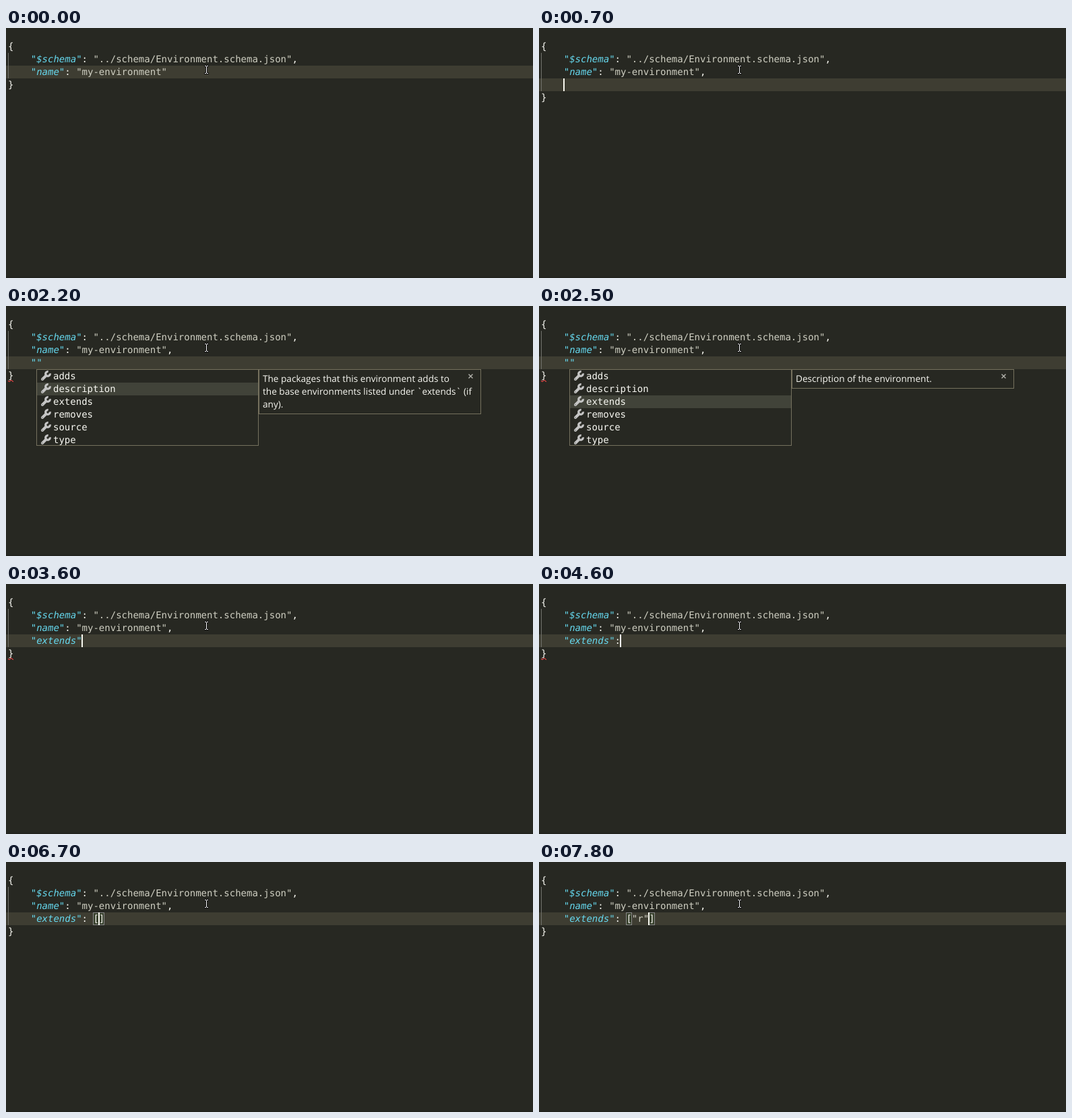
These frames come from a looping animation (782 by 372 pixels, 8000 ms). An HTML page with a canvas:

```html
<!DOCTYPE html>
<html lang="en">
<head>
<meta charset="utf-8">
<title>JSON editor with completions</title>
<style>
  html, body { margin: 0; width: 100%; height: 100%; overflow: hidden; background: #272822; }
  canvas { display: block; }
</style>
</head>
<body>
<canvas id="stage" width="782" height="372"></canvas>
<script>
const ctx = document.getElementById('stage').getContext('2d');
const W = 782, H = 372, LOOP = 8000;
const LEFT = 3, TOP = 18, LINE = 19, CHAR = 14 * 0.602, BASE = 14;
const MONO = '14px "DejaVu Sans Mono", monospace';
const SANS = '13.6px "Open Sans", "Noto Sans", sans-serif';
const C = {
  bg: '#272822', line: '#3e3d32', text: '#f8f8f2', key: '#66d9ef', string: '#cfcfc2',
  guide: '#70716b', border: '#75715e', selected: '#414339', error: '#ea4646', caret: '#f8f8f0'
};
const PROPS = ['adds', 'description', 'extends', 'removes', 'source', 'type'];
const DOCS = {
  adds: ['The packages that this environment adds to',
         'the base environments listed under `extends` (if', 'any).'],
  description: ['Description of the environment.'],
  extends: ['Other environments that this environment', 'extends by adding or removing packages.']
};
const NAME = '    "name": "my-environment"';

// Each step overrides part of the editor state from its time on.
const steps = [
  [0, { name: NAME, edit: null, row: 2, col: 28, caret: false, list: null, sel: 0, doc: null, error: null, match: null }],
  [400, { name: NAME + ',', col: 29 }],
  [500, { caret: true }],
  [700, { edit: '', row: 3, col: 4 }],
  [1200, { caret: false }],
  [1500, { edit: '    ""', col: 5, caret: true }],
  [1600, { list: PROPS, doc: 'adds', error: [2, 28] }],
  [2100, { caret: false, error: [4, 0] }],
  [2200, { sel: 1 }],
  [2300, { doc: 'description' }],
  [2500, { sel: 2 }],
  [2600, { doc: 'extends', caret: true }],
  [3100, { caret: false }],
  [3600, { edit: '    "extends"', col: 13, caret: true, list: null, doc: null }],
  [4100, { caret: false }],
  [4600, { edit: '    "extends":', col: 14, caret: true }],
  [4700, { list: ['[]'], sel: 0 }],
  [4800, { doc: 'array' }],
  [5100, { edit: '    "extends": ', col: 15 }],
  [5200, { list: null, doc: null }],
  [5700, { edit: '    "extends": []', col: 16 }],
  [5800, { match: [15, 16] }],
  [6200, { caret: false }],
  [6500, { error: null }],
  [6700, { caret: true }],
  [6800, { edit: '    "extends": [""]', col: 17 }],
  [6900, { match: null }],
  [7200, { edit: '    "extends": ["r"]', col: 18 }],
  [7700, { col: 19 }],
  [7800, { match: [15, 19] }]
];

const stateAt = t => Object.assign({}, ...steps.filter(s => s[0] <= t).map(s => s[1]));
const colX = col => LEFT + col * CHAR;
const rowY = row => TOP + row * LINE;

function fill(x, y, w, h, color) {
  ctx.fillStyle = color;
  ctx.fillRect(x, y, w, h);
}

function frame(x, y, w, h, color) {
  ctx.strokeStyle = color;
  ctx.lineWidth = 1;
  ctx.strokeRect(x + 0.5, y + 0.5, w - 1, h - 1);
}

function write(str, x, y, color, font = MONO) {
  ctx.font = font;
  ctx.fillStyle = color;
  ctx.fillText(str, x, y);
}

function codeLine(str, row) {
  const y = rowY(row) + BASE;
  let keyDone = false;
  for (const m of str.matchAll(/"[^"]*"|[^"]+/g)) {
    const s = m[0], at = m.index;
    if (s[0] !== '"') {
      write(s, colX(at), y, C.text);
    } else if (keyDone) {
      write(s, colX(at), y, C.string);
    } else {
      keyDone = true;
      write('"', colX(at), y, C.key);
      write(s.slice(1, -1), colX(at + 1), y, C.key, 'italic ' + MONO);
      write('"', colX(at + s.length - 1), y, C.key);
    }
  }
}

function squiggle([row, col]) {
  const x = Math.round(colX(col)), y = rowY(row) + LINE - 3;
  ctx.save();
  ctx.beginPath();
  ctx.rect(x, y, 8, 3);
  ctx.clip();
  ctx.strokeStyle = C.error;
  ctx.lineWidth = 1.1;
  ctx.beginPath();
  ctx.moveTo(x - 1.2, y - 0.2);
  for (let i = 0; i < 4; i++) ctx.lineTo(x + 1.8 + i * 3, y + (i % 2 ? 0.2 : 2.8));
  ctx.stroke();
  ctx.restore();
}

function wrench(x, y) {
  ctx.strokeStyle = '#c5c5c5';
  ctx.lineCap = 'round';
  ctx.lineWidth = 4;
  ctx.beginPath();
  ctx.moveTo(x + 3, y + 13);
  ctx.lineTo(x + 8.5, y + 7.5);
  ctx.stroke();
  ctx.lineCap = 'butt';
  ctx.lineWidth = 3.2;
  ctx.beginPath();
  ctx.arc(x + 11, y + 5, 3.3, -0.2, Math.PI * 1.5 + 0.2);
  ctx.stroke();
  fill(x + 2.5, y + 12.5, 1, 1, C.bg);
}

function valueIcon(x, y) {
  for (const [dx, dy] of [[8, 2], [1, 8]]) {
    fill(x + dx, y + dy, 8, 7, C.selected);
    frame(x + dx, y + dy, 8, 7, '#e8ab53');
    fill(x + dx + 2, y + dy + 2, 4, 1, '#e8ab53');
    fill(x + dx + 2, y + dy + 4, 4, 1, '#e8ab53');
  }
}

function panel(x, h) {
  fill(x, 94, 330, h, C.bg);
}

function completions(s) {
  const x = Math.round(colX(s.col)), y = 94, h = s.list.length * LINE;
  panel(x, h);
  ctx.save();
  ctx.beginPath();
  ctx.rect(x, y, 330, h);
  ctx.clip();
  fill(x, y + 1 + s.sel * LINE, 330, LINE, C.selected);
  s.list.forEach((item, i) => {
    const top = y + 1 + i * LINE;
    (item === '[]' ? valueIcon : wrench)(x + 6, top + 1);
    write(item, x + 25, top + BASE, C.text);
  });
  ctx.restore();
  frame(x, y, 330, h, C.border);
  if (s.doc) details(s.doc, x + 330);
}

function details(doc, x) {
  const lines = DOCS[doc], h = lines ? 10 + lines.length * LINE : 37;
  panel(x, h);
  frame(x, 94, 330, h, C.border);
  if (lines) lines.forEach((str, i) => write(str, x + 6, 113 + i * LINE, C.text, SANS));
  else write('New array', x + 6, 113, '#b9b9b3');
  ctx.strokeStyle = '#b4b4ae';
  ctx.lineWidth = 1.4;
  ctx.beginPath();
  for (const d of [-3, 3]) {
    ctx.moveTo(x + 314.5 - 3, 104.5 - d);
    ctx.lineTo(x + 314.5 + 3, 104.5 + d);
  }
  ctx.stroke();
}

function pointer() {
  const parts = [[295, 56, 2, 1], [298, 56, 2, 1], [297, 57, 1, 10], [295, 67, 2, 1], [298, 67, 2, 1]];
  for (const [x, y, w, h] of parts) fill(x - 1, y - 1, w + 2, h + 2, '#111');
  for (const [x, y, w, h] of parts) fill(x, y, w, h, '#fff');
}

function draw(t) {
  const s = stateAt(t), last = s.edit === null ? 3 : 4;
  fill(0, 0, W, H, C.bg);
  fill(0, H - 2, W, 2, '#22231e');
  fill(0, rowY(s.row), W, LINE, C.line);
  fill(3, rowY(1), 1, (last - 1) * LINE, C.guide);

  for (const col of s.match || []) {
    const x = Math.round(colX(col)), w = Math.round(colX(col + 1)) - x;
    fill(x, rowY(3), w, LINE, 'rgba(0,100,0,.1)');
    frame(x, rowY(3), w, LINE, '#888');
  }

  codeLine('{', 0);
  codeLine('    "$schema": "../schema/Environment.schema.json",', 1);
  codeLine(s.name, 2);
  if (s.edit) codeLine(s.edit, 3);
  codeLine('}', last);

  if (s.error) squiggle(s.error);
  if (s.caret) fill(Math.round(colX(s.col) - 1), rowY(s.row), 2, LINE, C.caret);
  if (s.list) completions(s);
  pointer();
}

ctx.textRendering = 'geometricPrecision';
const start = performance.now();
function tick() {
  draw((performance.now() - start) % LOOP);
  requestAnimationFrame(tick);
}
tick();
</script>
</body>
</html>
```
